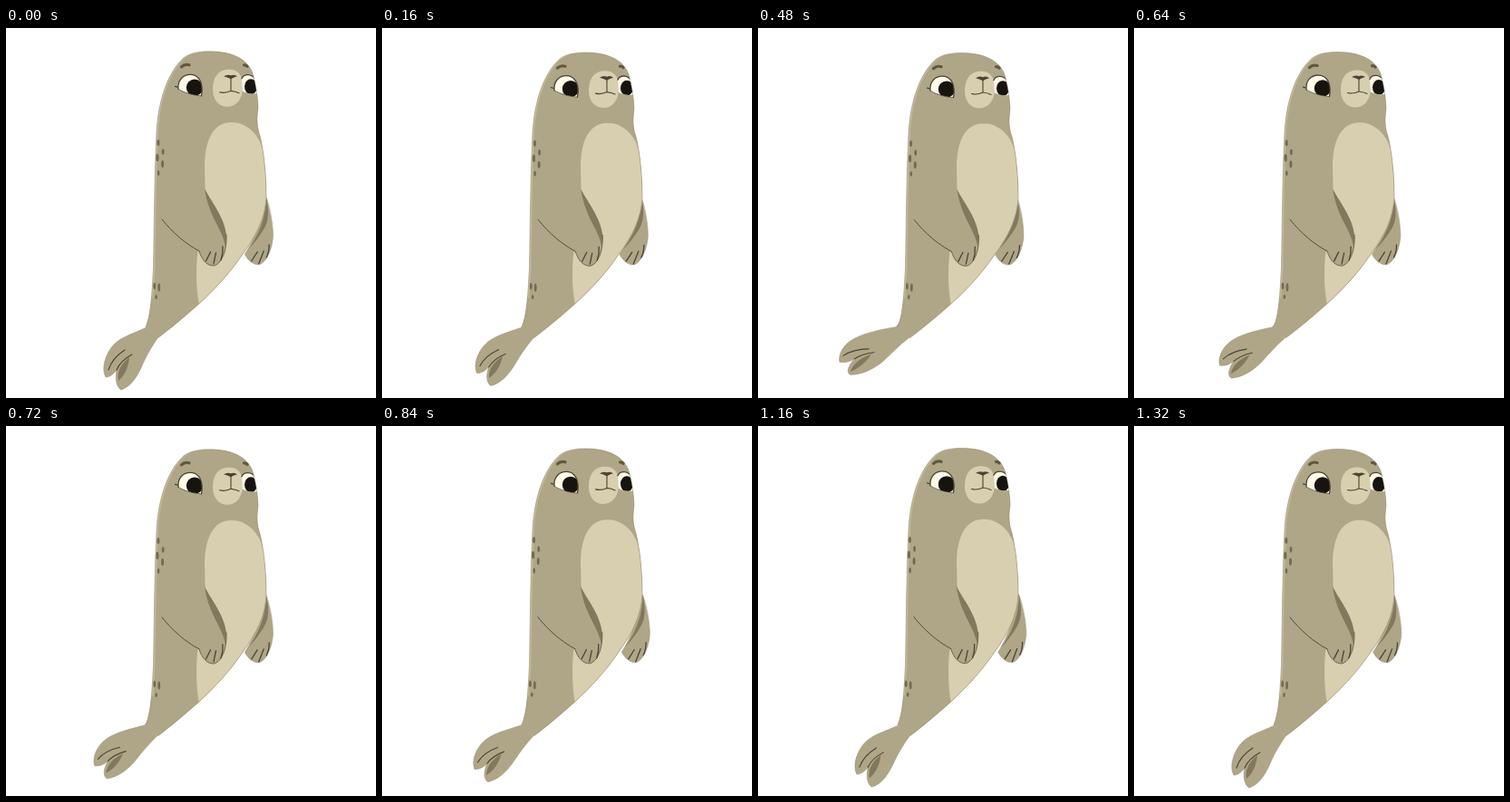
These frames come from a looping animation (408x408 px, 1360 ms). An HTML page:

```html
<!DOCTYPE html>
<html lang="en">
<head>
<meta charset="utf-8">
<title>Floating seal</title>
<style>
html, body { margin: 0; width: 100%; height: 100%; overflow: hidden; background: #fff; }
svg { display: block; width: 100vw; height: 100vh; }
.line { fill: none; stroke: #4b4333; stroke-width: 1.3; stroke-linecap: round; stroke-linejoin: round; }
.edge { fill: none; stroke: #999177; stroke-width: .6; }
.skin { fill: #afa688; }
.pale { fill: #d8cfb0; }
.dark { fill: #81785d; }
.spot { fill: #736a50; }
</style>
</head>
<body>
<svg viewBox="0 0 408 408">
  <defs>
    <path id="shape" d="M154 330C160 316 161 292 162.5 264C163.5 215 163.5 165 166 115C167 97 170 81 175 67C180 53 187 41 196 33C203 28 212 26 224 26C247 26 265 33 271.5 49C275 60 277.5 75 278 88C276 103 277 110 280 119C284 135 287 160 287 186C286 210 275 230 262 248C246 272 226 293 205 311C190 324 178 334 167 342"/>
    <clipPath id="inside"><use href="#shape"/></clipPath>
    <clipPath id="eyeL"><path d="M190 67.5C189 57 196 51 204 51.5C213 52 218 61 215.5 75C206 74.5 196 71.5 190 67.5Z"/></clipPath>
    <clipPath id="eyeR"><path d="M260 56C262 50.5 271 50 275 57L278 72C271 74 265 72 261 70Z"/></clipPath>
  </defs>

  <g id="tail">
    <path class="skin" data-to="M159 312C157 322 155 328 151 330C134 333 115 338 106 344C96 350 90 361 92 370C98 371 104 369 108 366C101 375 100 381 104 384C116 384 129 377 139 368C147 360 156 350 166 342L172 322"
      d="M159 312C158 322 157 327 153 331C143 336 128 340 119 349C109 360 105 376 110 385C115 385 119 381 122 377C120 388 122 396 127 399C139 395 146 382 151 370C156 359 161 351 167 342L172 322"/>
    <path class="edge" data-to="M151 330C134 333 115 338 106 344C96 350 90 361 92 370C98 371 104 369 108 366C101 375 100 381 104 384C116 384 129 377 139 368C147 360 156 350 166 342"
      d="M153 331C143 336 128 340 119 349C109 360 105 376 110 385C115 385 119 381 122 377C120 388 122 396 127 399C139 395 146 382 151 370C156 359 161 351 167 342"/>
    <path class="dark" data-to="M104 380C106 372 113 365 126 360C121 369 113 376 104 380Z"
      d="M124 389C122 380 126 371 136 363C135 374 131 383 124 389Z"/>
    <path class="line" style="stroke-width:1.1" data-to="M96 363Q106 355 123 354M108 366Q116 360 129 358"
      d="M113 377Q117 364 131 355M122 377Q126 367 139 360"/>
  </g>

  <g id="body">
    <g id="armR">
      <path class="skin" d="M286 184C290 197 294 213 294.3 229C293.5 243 288 256 281 260C276 263 267 258 263 249C270 238 281 218 286 184Z"/>
      <path class="edge" d="M287 187C291 199 294 213 294.3 229C293.5 243 288 256 281 260C276 263 267 258 263 249"/>
      <path class="dark" d="M287 187C290 201 290 213 284 222C279 230 274 237 267 244C277 230 286 213 287 187Z"/>
      <path class="line" d="M270.5 257L277 247M278.5 260L284 246M287 253Q290 247 290 239"/>
    </g>
    <use href="#shape" fill="#c3ba9c"/>
    <g clip-path="url(#inside)">
      <use href="#shape" x="1.8" class="skin"/>
      <path class="skin" d="M145 345L158 300L230 250L220 320L165 345Z"/>
      <path class="pale" d="M249 104C229 104 220 122 219 150L220 200L211 250C209 270 210 290 213 306L245 290L290 220L290 150L284 138C280 117 265 104 249 104Z"/>
    </g>
    <use href="#shape" class="edge"/>

    <g id="armL">
      <path class="skin" d="M219 177C225 190 241 208 243 228C244 243 239 259 230 262C222 263 216 256 213 246C198 238 184 226 172 211L190 180Z"/>
      <path class="dark" d="M219 177C225 190 241 208 243 229L242 241C239 221 224 210 219 177Z"/>
      <path class="line" style="stroke-width:.9" d="M172 211C184 226 198 238 213 246"/>
      <path class="line" style="stroke-width:.7" d="M213 246C216 256 222 263 230 262C239 259 244 243 243 228"/>
      <path class="line" d="M220.5 257L225.5 247M229 260L231.5 248M237 256Q239.5 249 239 241"/>
    </g>

    <g id="spots" class="spot"></g>

    <g id="face">
      <path class="pale" d="M246 46C233 46 228 56 228 68C228 80 235 87 244 87C255 87 262 77 261 62C260 52 256 46 246 46Z"/>
      <g clip-path="url(#eyeL)">
        <rect x="185" y="48" width="36" height="30" fill="#fffbe8"/>
        <circle cx="208" cy="66" r="9.2" fill="#17130f"/>
      </g>
      <path class="line" d="M186.5 64.5L190 65.5M190 67.5C189 57 196 51 204 51.5C213 52 218 61 215.5 75"/>
      <path class="line" style="stroke-width:.7" d="M190 67.5C196 71.5 206 74.5 215.5 75"/>
      <g clip-path="url(#inside)">
        <g clip-path="url(#eyeR)">
          <rect x="257" y="48" width="22" height="28" fill="#fffbe8"/>
          <ellipse cx="270" cy="65" rx="7" ry="8.5" fill="#17130f"/>
        </g>
        <path class="line" d="M260 56C262 50.5 271 50 275 57L278 72"/>
      </g>
      <path class="line" style="stroke:#62583f;stroke-width:3.2" d="M193.5 43Q197 39.5 202 41M262.5 41Q265 41 266 42.5"/>
      <path fill="#4b4333" d="M240 53.5Q244 51 248 52.5Q252 51 255 53.5Q251 54.5 248 56.5Q244 54.5 240 53.5Z"/>
      <path class="line" style="stroke-width:1.1" d="M248 54V69.5M235.5 71Q242 72.5 248 69.5Q253 70 257 72"/>
    </g>
  </g>
</svg>
<script>
const LOOP = 1360, STEP = 40;
const el = id => document.getElementById(id);

// x, y, rx, ry
const spots = [
  [168, 126.5, 1.5, 3.5], [173.2, 136.5, 1.4, 3.2], [167, 143, 1.6, 4.2], [172.7, 150, 1.5, 4],
  [168.2, 160, 1.3, 3], [163.8, 284.5, 1.4, 3.8], [168.8, 286, 1.4, 4.5], [165.7, 296.5, 1.3, 2.5]
];
el('spots').innerHTML = spots.map(([x, y, rx, ry]) =>
  `<ellipse cx="${x}" cy="${y}" rx="${rx}" ry="${ry}"/>`).join('');

// time, tail swing
const swing = [[0, 0], [160, .3], [320, .98], [440, 1.13], [560, 1.01], [640, .86],
  [840, .44], [1160, .06], [1320, 0], [LOOP, 0]];

// Smooth curve through the swing keys
function tailAt(t) {
  const n = swing.length;
  const slope = i => {
    if (i === 0 || i >= n - 2) return 0;
    const a = swing[i - 1], b = swing[i + 1];
    return (b[1] - a[1]) / (b[0] - a[0]);
  };
  let i = 0;
  while (i < n - 2 && t >= swing[i + 1][0]) i++;
  const [t0, v0] = swing[i], [t1, v1] = swing[i + 1];
  const h = t1 - t0, u = (t - t0) / h, w = 1 - u;
  return v0 * w * w * (1 + 2 * u) + v1 * u * u * (3 - 2 * u)
    + h * u * w * (slope(i) * w - slope(i + 1) * u);
}

const number = /-?\d+(\.\d+)?/g;
const bends = [...document.querySelectorAll('#tail path')].map(path => {
  const from = path.getAttribute('d');
  return { path, from, to: path.dataset.to.match(number).map(Number) };
});

function draw(t) {
  const k = tailAt(t);
  for (const { path, from, to } of bends) {
    let i = 0;
    path.setAttribute('d', from.replace(number, v => (+v + (to[i++] - v) * k).toFixed(2)));
  }
  const s = Math.sin((t - 20) / LOOP * 2 * Math.PI);
  const move = (id, value) => el(id).setAttribute('transform', value);
  move('body', `translate(0 335) scale(1 ${1 - 1.8 * s / 309}) translate(0 -335)`);
  move('spots', `translate(${.7 * s} 0)`);
  move('face', `translate(0 ${.3 * s})`);
  move('armL', `translate(${.4 * s} 0)`);
  move('armR', `translate(${-s} 0) rotate(${.9 * s} 286 186)`);
}

let start;
function tick(now) {
  start ??= now;
  draw(Math.floor((now - start) % LOOP / STEP) * STEP);
  requestAnimationFrame(tick);
}
draw(0);
requestAnimationFrame(tick);
</script>
</body>
</html>
```
